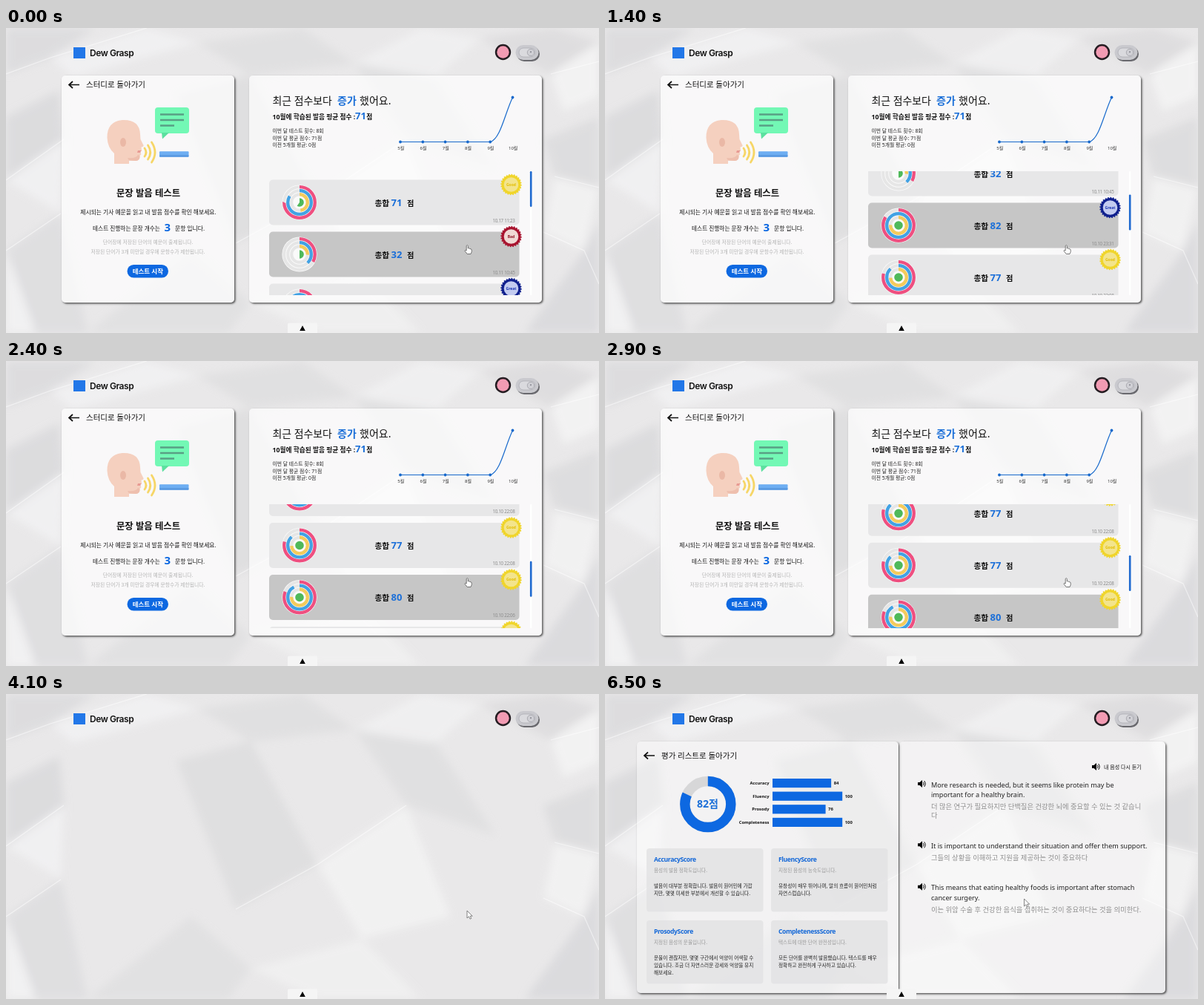
An HTML page that plays this animation: 800x411 px, repeating every 6.7 s.

```html
<!DOCTYPE html>
<html lang="ko">
<head>
<meta charset="utf-8">
<style>
html, body { margin: 0; width: 100%; height: 100%; overflow: hidden; background: #e8e7e8; }
#stage { position: relative; width: 800px; height: 411px; overflow: hidden; }
section, svg { position: absolute; left: 0; top: 0; width: 800px; height: 411px; }
text { font-family: "Noto Sans", "Noto Sans CJK KR", "Noto Sans CJK JP", sans-serif; white-space: pre; }
.panel { position: absolute; border-radius: 5px; box-shadow: 1.5px 1.5px 2.5px rgba(0,0,0,.65); }
#list .panel { background: rgba(255,255,255,.72); }
#result .panel { background: rgba(255,255,255,.42); }
</style>
</head>
<body>
<div id="stage">
  <svg id="paper"></svg>
  <section id="list">
    <div class="panel" style="left:75px;top:64px;width:233px;height:306px"></div>
    <div class="panel" style="left:328px;top:64px;width:395px;height:306px"></div>
    <svg id="listArt"></svg>
  </section>
  <section id="result">
    <div class="panel" style="left:43px;top:64px;width:353px;height:339px"></div>
    <div class="panel" style="left:397px;top:64px;width:359px;height:339px"></div>
    <svg id="resultArt"></svg>
  </section>
  <svg id="chrome"></svg>
</div>
<script>
const $ = id => document.getElementById(id);
const BLUE = '#0d68e1', INK = '#111';
const LOOP = 6700, STEP = 100;

// ---------- drawing helpers ----------
const text = (x, y, size, str, { fill = INK, weight = 400, anchor = 'start', extra = '' } = {}) =>
  `<text x="${x}" y="${y}" font-size="${size}" fill="${fill}" font-weight="${weight}" text-anchor="${anchor}" ${extra}>${str}</text>`;
const rect = (x, y, w, h, fill, r = 0, extra = '') =>
  `<rect x="${x}" y="${y}" width="${w}" height="${h}" rx="${r}" fill="${fill}" ${extra}/>`;
const circle = (x, y, r, fill, extra = '') =>
  `<circle cx="${x}" cy="${y}" r="${r}" fill="${fill}" ${extra}/>`;
const line = (d, stroke, width, extra = '') =>
  `<path d="${d}" fill="none" stroke="${stroke}" stroke-width="${width}" ${extra}/>`;
const arc = (x, y, r, width, color, percent, extra = '') =>
  circle(x, y, r, 'none', `stroke="${color}" stroke-width="${width}" pathLength="100"
    stroke-dasharray="${percent} ${100.01 - percent}" transform="rotate(-90 ${x} ${y})" ${extra}`);
const backArrow = (x, y) =>
  line(`M${x + 15} ${y}H${x + 1}M${x + 6} ${y - 4.5}L${x + 1} ${y}L${x + 6} ${y + 4.5}`, INK, 1.7);
const speaker = (x, y) => `<g transform="translate(${x} ${y})">
  <path d="M0-2H2.5L6-5V5L2.5 2H0Z"/>${line('M7.3-2.2Q9 0 7.3 2.2M8.6-4Q11.8 0 8.6 4', INK, 1)}</g>`;

// ---------- crumpled paper ----------
const facets = [
  ['#d9d9db', '0,0 120,0 60,40 0,62'], ['#f3f3f4', '60,40 190,0 260,20 90,66'],
  ['#dededf', '260,20 400,0 470,48 330,64'], ['#f2f2f3', '470,48 560,0 640,14 580,66'],
  ['#dbdadc', '640,14 740,0 800,20 735,62'], ['#f6f6f6', '735,62 800,20 800,92 752,112'],
  ['#d8d8da', '0,120 72,84 78,150 0,205'], ['#f3f3f4', '0,205 78,150 74,250'],
  ['#dcdcde', '0,300 74,250 110,411 40,411'], ['#f4f4f5', '0,300 40,411 0,411'],
  ['#dadadc', '725,150 800,120 800,215 740,200'], ['#f4f4f4', '740,200 800,215 780,300 725,275'],
  ['#d7d7da', '780,300 800,260 800,411 700,411'], ['#dfdfe0', '110,411 250,300 330,370 300,411'],
  ['#f2f2f2', '330,370 480,330 560,411 420,411'], ['#dcdcdd', '230,90 330,64 420,230 310,290'],
  ['#dededf', '470,48 580,66 660,190 540,150'], ['#f4f4f4', '420,230 540,150 600,300 480,330']
];
$('paper').innerHTML = `<defs><filter id="soft"><feGaussianBlur stdDeviation="6"/></filter></defs>
  ${rect(0, 0, 800, 411, '#e9e8e9')}
  <g filter="url(#soft)" opacity=".75">${facets.map(([c, p]) => `<polygon points="${p}" fill="${c}"/>`).join('')}</g>
  ${line('M0 62L60 40L190 0M735 62L800 45M0 205L78 150M740 200L800 215M0 300L74 250M725 275L780 300L800 345M310 290L420 230L540 150', '#fff', 1.2, 'opacity=".5"')}`;

// ---------- permanent header and footer ----------
$('chrome').innerHTML = `
  ${rect(91, 26, 16, 15, '#2277e8')}
  ${text(113, 38, 12, 'Dew Grasp', { weight: 600, extra: 'style="font-family:Inter,sans-serif;letter-spacing:-.45px"' })}
  ${circle(670.5, 32.5, 10.7, '#251d22')}${circle(670.5, 32.5, 8.2, '#f29bb3')}
  ${rect(689, 25, 31, 20, '#68686d', 10)}${rect(687.5, 23, 31, 20, '#c9c9ce', 10)}
  ${rect(692, 27, 22, 12, '#dadade', 6, 'stroke="#aaaab0" stroke-width=".7"')}
  ${circle(708, 33, 4.7, '#d0d0d5', 'stroke="#98989f" stroke-width=".7"')}${circle(708, 32.3, 1, '#85858d')}
  ${rect(380, 397.5, 40, 16, '#f5f5f5', 2)}<path d="M400 401L403.8 408H396.2Z"/>
  <g id="hand"><path d="M621.2 300V293.4Q622.3 291.8 623.3 293.4V297Q624.7 296 625.2 297.4Q626.4 296.8 626.8 298Q628.2 297.7 628.2 299.4V301.5L627 304.5H622.2L618.9 300.2Q619.2 298.6 621.2 300Z"
    fill="#fff" stroke="#555" stroke-width=".8"/></g>
  <g id="arrow"><path d="M0 0V10L2.4 7.8L4 11.2L5.7 10.4L4.2 7.2H7.2Z" fill="#fff" stroke="#666" stroke-width=".8"/></g>`;

// ---------- score list ----------
// score, badge, date, [accuracy, fluency, prosody, completeness]
const rows = [
  [71, 'Good', '10.17 11:23', [75, 84, 48, 60]], [32, 'Bad', '10.11 10:45', [33, 38, 26, 50]],
  [82, 'Great', '10.10 23:31', [84, 100, 76, 100]], [77, 'Good', '10.10 22:08', [79, 88, 74, 100]],
  [77, 'Good', '10.10 22:08', [79, 88, 74, 100]], [80, 'Good', '10.10 22:06', [81, 92, 76, 100]],
  [76, 'Good', '10.10 22:04', [78, 86, 72, 100]], [73, 'Good', '10.10 22:01', [75, 84, 70, 90]]
];
const badgeColors = { Good: ['#f0d52b', '#f3e48c', '#e3bd00'], Bad: ['#a8142f', '#f0d9d4', '#8c1020'], Great: ['#10208e', '#c3cbf0', '#1530b0'] };
const ringColors = ['#ef4f80', '#42a2e4', '#f4cb5c', '#4fb95a'];
const ROW_TOP = 204.5, ROW_PITCH = 70, VIEW_TOP = 193, VIEW_H = 167;

function badge(y, label) {
  const [rim, face, ink] = badgeColors[label];
  return circle(681.5, y, 13, rim, `stroke="${rim}" stroke-width="2.4" pathLength="48" stroke-dasharray="1 1"`) +
    circle(681.5, y, 12.4, rim) + circle(681.5, y, 9.8, face) +
    text(681.5, y + 1.8, 5, label, { fill: ink, weight: 700, anchor: 'middle' });
}
function scoreRow([score, label, date, parts], i) {
  const y = ROW_TOP + i * ROW_PITCH, cy = y + 30.5;
  const rings = parts.map((p, k) => k < 3
    ? circle(396, cy, 20.8 - 5 * k, 'none', 'stroke="#e6e6e6" stroke-width="4"') + arc(396, cy, 20.8 - 5 * k, 4.3, ringColors[k], p)
    : arc(396, cy, 2.9, 5.8, ringColors[k], p)).join('');
  return rect(355, y, 337.5, 61, '#e7e7e8', 5, 'class="row"') + circle(396, cy, 23.6, '#fafafa') + rings +
    text(497.5, y + 35, 10.7, '총합', { weight: 700 }) +
    text(519.5, y + 35.3, 13, score, { weight: 600, fill: '#1b6fd8' }) +
    text(541, y + 35, 10.2, '점', { weight: 700 }) +
    text(686.5, y + 57.3, 6.2, date, { fill: '#8c8c8c', weight: 300, anchor: 'end', extra: 'letter-spacing="-.3"' }) +
    badge(y + 6.5, label);
}

const months = [5, 6, 7, 8, 9, 10];
const monthX = i => 532 + 30.3 * i;
const monthY = i => i < 5 ? 153.5 : 93.5;
const chart = line(`M532 153.5H${monthX(4)}C667 150 673 115 ${monthX(5)} 93.5`, '#1769cc', 1.2) +
  months.map((m, i) => circle(monthX(i), monthY(i), 1.9, '#1769cc') +
    text(monthX(i) + .7, 163.5, 6, m + '월', { anchor: 'middle', fill: '#333' })).join('');

const speakingHead = `
  <path d="M146 183V169Q137 161 136.5 148Q136 126 157 124Q180 123 181 143L181.5 150L185.5 158Q186 160 182.5 160.5L183 165L181 167L182.5 170L180.5 172Q181 179 175 179L166 178.5V183Z" fill="#f5d0bf"/>
  <path d="M166 178.5L175 179Q181 179 180.5 172L178 171Q176 176 164 175Z" fill="#eebfae"/>
  <ellipse cx="158" cy="154" rx="4" ry="6" fill="#eab8a6"/><path d="M177 168H182L181 167L183 165H178Z" fill="#e89a92"/>
  ${line('M187 162Q191 167.5 187 173M191.5 158Q198 167.5 191.5 177M196.5 154Q205.5 167.5 196.5 181', '#f6d667', 2.8, 'stroke-linecap="round"')}
  ${rect(207, 166.2, 39.5, 7.6, '#6eaef2', 1)}${rect(207, 171, 39.5, 2.8, '#5b9be2', 1)}
  ${rect(201, 107, 46, 35, '#73f8b5', 4)}<path d="M210 141L211 149.5L220 141Z" fill="#5be09f"/>
  ${line('M208 116.5H240M208 124H240M208 131.5H227', '#5a9f85', 2.6)}`;

const pale = { fill: '#b4b4b4', anchor: 'middle' };
$('listArt').innerHTML = `
  <defs><clipPath id="view">${rect(350, VIEW_TOP, 352, VIEW_H, '#000')}</clipPath></defs>
  ${backArrow(84, 76.5)}${text(108, 80.3, 10.5, '스터디로 돌아가기', { weight: 500 })}
  ${speakingHead}
  ${text(192, 227, 12.4, '문장 발음 테스트', { weight: 700, anchor: 'middle' })}
  ${text(192, 251, 7.8, '제시되는 기사 예문을 읽고 내 발음 점수를 확인 해보세요.', { anchor: 'middle' })}
  ${text(117, 273, 7.7, '테스트 진행하는 문장 개수는')}
  ${text(213.5, 274, 15, '3', { fill: BLUE, weight: 800 })}
  ${text(228, 273, 7.8, '문항 입니다.')}
  ${text(191.5, 291, 6.8, '단어장에 저장된 단어의 예문이 출제됩니다.', pale)}
  ${text(191.5, 304, 6.8, '저장된 단어가 3개 미만일 경우에 문항수가 제한됩니다.', pale)}
  ${rect(163.5, 319, 55.5, 17.5, BLUE, 8.7)}
  ${text(191.3, 330.8, 8.5, '테스트 시작', { fill: '#fff', weight: 700, anchor: 'middle' })}
  ${text(359.5, 103, 13.9, '최근 점수보다', { weight: 500 })}
  ${text(447, 103, 14, '증가', { fill: '#1b6fd8', weight: 700 })}
  ${text(477, 103, 14, '했어요.', { weight: 500 })}
  ${text(359.5, 122.8, 8.7, '10월에 학습된 발음 평균 점수 :', { weight: 700 })}
  ${text(471, 123.3, 13, '71', { fill: '#1b6fd8', weight: 600 })}
  ${text(486.3, 122.8, 8.7, '점', { weight: 700 })}
  ${['이번 달 테스트 횟수: 8회', '이번 달 평균 점수: 71점', '이전 5개월 평균: 0점']
    .map((s, i) => text(359.5, 141 + 9.7 * i, 6.8, s, { fill: '#222' })).join('')}
  ${chart}
  <g clip-path="url(#view)"><g id="rows">${rows.map(scoreRow).join('')}</g></g>
  ${rect(707, VIEW_TOP, 2.4, VIEW_H, '#fff', 1)}
  ${rect(706.9, VIEW_TOP, 2.6, 48, '#1e69cf', 1.2, 'id="thumb"')}`;

// ---------- result page ----------
const bars = [['Accuracy', 84], ['Fluency', 100], ['Prosody', 76], ['Completeness', 100]];
const cards = [
  ['AccuracyScore', '음성의 발음 정확도입니다.', '발음이 대부분 정확합니다. 발음이 원어민에 가깝', '지만, 몇몇 미세한 부분에서 개선할 수 있습니다.'],
  ['FluencyScore', '지정된 음성의 능숙도입니다.', '유창성이 매우 뛰어나며, 말의 흐름이 원어민처럼', '자연스럽습니다.'],
  ['ProsodyScore', '지정된 음성의 운율입니다.', '운율이 괜찮지만, 몇몇 구간에서 억양이 어색할 수', '있습니다. 조금 더 자연스러운 강세와 억양을 유지', '해보세요.'],
  ['CompletenessScore', '텍스트에 대한 단어 완전성입니다.', '모든 단어를 완벽히 발음했습니다. 텍스트를 매우', '정확하고 완전하게 구사하고 있습니다.']
];
function card([title, sub, ...body], i) {
  const x = 56 + 168 * (i % 2), y = 208 + 97 * (i >> 1);
  return rect(x, y, 157.5, 85.5, '#e3e3e4', 4, 'opacity=".8"') +
    text(x + 10, y + 18.3, 8.6, title, { fill: '#1468d8', weight: 700, extra: 'letter-spacing="-.4"' }) +
    text(x + 10, y + 31.8, 6.6, sub, { fill: '#999' }) +
    body.map((s, k) => text(x + 10, y + 53.3 + 9.8 * k, 6.65, s, { fill: '#222' })).join('');
}
// icon height, then [baseline, string] for English and Korean lines
const sentences = [
  [121, [[125.5, 'More research is needed, but it seems like protein may be'], [139.3, 'important for a healthy brain.']],
    [[155, '더 많은 연구가 필요하지만 단백질은 건강한 뇌에 중요할 수 있는 것 같습니'], [167, '다']]],
  [203.3, [[208, 'It is important to understand their situation and offer them support.']],
    [[223.5, '그들의 상황을 이해하고 지원을 제공하는 것이 중요하다']]],
  [259.7, [[264, 'This means that eating healthy foods is important after stomach'], [278, 'cancer surgery.']],
    [[294, '이는 위암 수술 후 건강한 음식을 섭취하는 것이 중요하다는 것을 의미한다.']]]
];
$('resultArt').innerHTML = `
  ${backArrow(52, 83)}${text(76, 87, 10.5, '평가 리스트로 돌아가기', { weight: 500 })}
  ${circle(138.8, 148.5, 31, 'none', 'stroke="#d7d7d8" stroke-width="13.4"')}
  ${arc(138.8, 148.5, 31, 13.4, BLUE, 0, 'id="gauge"')}
  ${text(138.5, 153, 14, '82점', { fill: '#1b6fd8', weight: 600, anchor: 'middle' })}
  ${bars.map(([name], i) => {
    const y = 114 + 17.6 * i;
    return text(221.5, y + 8, 5.8, name, { weight: 700, anchor: 'end' }) +
      rect(226, y, 0, 12.2, BLUE, 0, 'class="bar"') +
      text(226, y + 8.2, 5.9, bars[i][1], { weight: 700, extra: 'class="value"' });
  }).join('')}
  ${cards.map(card).join('')}
  ${speaker(657, 98)}${text(673, 101, 7, '내 음성 다시 듣기')}
  ${sentences.map(([y, en, ko]) => speaker(422, y) +
    en.map(([b, s]) => text(440, b, 9.1, s, { fill: '#222' })).join('') +
    ko.map(([b, s]) => text(440, b, 9.3, s, { fill: '#8f8f8f' })).join('')).join('')}`;

// ---------- motion ----------
const scrollKeys = [[0, 0], [200, 0], [700, 97], [900, 109], [1500, 109], [2100, 258], [2400, 266.5], [2800, 266.5], [3400, 105.5], [3600, 95]];
const hoverKeys = [[0, 1], [900, 2], [2100, 5], [3500, 2]];
const LIST_END = 4100, RESULT_START = 4300, GROW_START = 4340, GROW_MS = 1000;
const MAX_SCROLL = 413;

const clamp = v => Math.max(0, Math.min(1, v));
const easeOutQuart = p => 1 - (1 - p) ** 4;
function tween(keys, t) {
  const n = keys.findIndex(k => k[0] > t);
  if (n < 0) return keys[keys.length - 1][1];
  const [t0, a] = keys[n - 1], [t1, b] = keys[n];
  return a + (b - a) * (t - t0) / (t1 - t0);
}
const show = (id, on) => { $(id).style.visibility = on ? 'visible' : 'hidden'; };

const rowBoxes = document.querySelectorAll('.row');
const barBoxes = document.querySelectorAll('.bar');
const barValues = document.querySelectorAll('.value');

function draw(t) {
  const scroll = tween(scrollKeys, t);
  const hovered = hoverKeys.filter(k => k[0] <= t).pop()[1];
  $('rows').setAttribute('transform', `translate(0 ${-scroll})`);
  $('thumb').setAttribute('y', VIEW_TOP + scroll / MAX_SCROLL * (VIEW_H - 48));
  rowBoxes.forEach((box, i) => box.setAttribute('fill', i === hovered ? '#c6c6c6' : '#e7e7e8'));

  show('list', t < LIST_END);
  show('result', t >= RESULT_START);
  show('hand', t < LIST_END);
  show('arrow', t >= LIST_END);

  const grow = easeOutQuart(clamp((t - GROW_START) / GROW_MS));
  $('gauge').setAttribute('stroke-dasharray', `${82 * grow} 101`);
  bars.forEach(([, value], i) => {
    const w = value * .942 * grow;
    barBoxes[i].setAttribute('width', w);
    barValues[i].setAttribute('x', 229.5 + w);
  });

  const move = easeOutQuart(clamp((t - RESULT_START) / 400));
  $('arrow').setAttribute('transform', `translate(${622 - 56.5 * move} ${292 - 16 * move})`);
}

const start = performance.now();
function tick() {
  const t = (performance.now() - start) % LOOP;
  draw(Math.min(6500, Math.floor(t / STEP) * STEP));
  requestAnimationFrame(tick);
}
tick();
</script>
</body>
</html>
```
